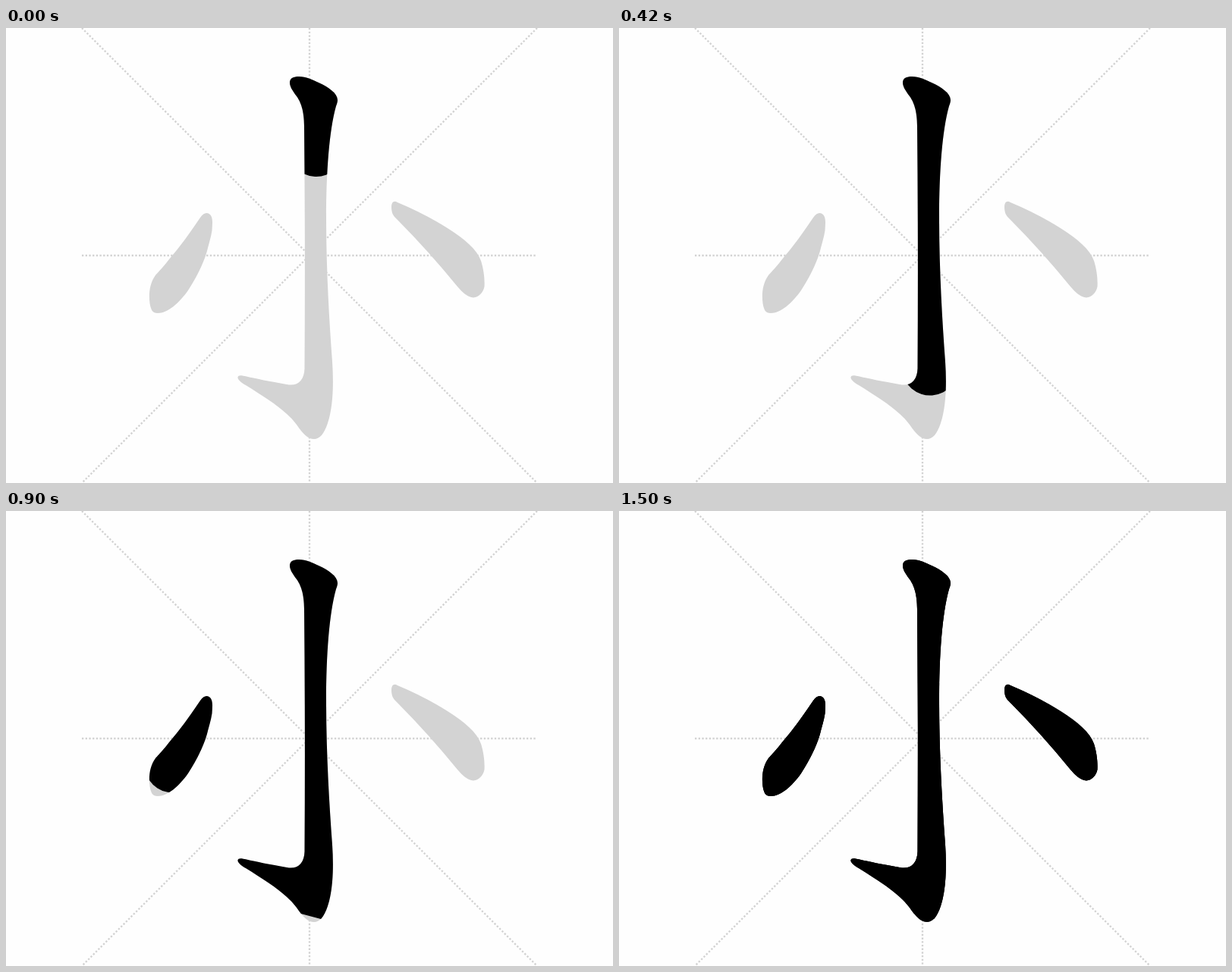
An HTML page that plays this animation: 800 by 600 pixels, repeating every 1.56 s.

```html
<!DOCTYPE html>
<html lang="zh">
<head>
<meta charset="utf-8">
<title>Stroke order</title>
<style>
  html, body { margin: 0; width: 100%; height: 100%; overflow: hidden; background: #fefefe; }
  svg { display: block; width: 800px; height: 600px; }
  .grid { stroke: lightgray; stroke-width: 2.344; stroke-dasharray: 2.344; }
  .ghost { fill: lightgray; }
  .brush { fill: none; stroke: #000; stroke-width: 75; stroke-linecap: round; stroke-dasharray: 1000; }
  .whole { opacity: 0; }
</style>
</head>
<body>
<svg viewBox="0 0 800 600">
  <g class="grid">
    <line x1="100" y1="0" x2="700" y2="600"/>
    <line x1="700" y1="0" x2="100" y2="600"/>
    <line x1="400" y1="0" x2="400" y2="600"/>
    <line x1="100" y1="300" x2="700" y2="300"/>
  </g>
</svg>
<script>
const LOOP = 1560, STEP = 60, DASH = 1000, HIDDEN = -50;

// keys: [time in ms, inked length along the median]
const strokes = [
  {
    outline: 'M374 72C374 66 379 64 386 64C396 64 403 68 412 72C425 78 437 86 437 95C437 98 436 100 435 103' +
      'C426 135 422 190 422 250C422 320 426 385 430 440C432 470 431 500 424 521C419 536 413 542 406 542' +
      'C398 542 391 535 383 523C369 504 343 488 316 471C309 467 305 463 305.5 460.5C306 457 311 458 317 459.5' +
      'Q336 464 370 470C384 473 393 465 393.5 449Q394.5 290 393 130C393 108 388 97 383 90C377 82 374 77 374 72Z',
    median: 'M384 74L412 98L409 160L408 250L410 447L414 499L384 491L349 478L313 463',
    keys: [[0, 97.5], [180, 188.5], [420, 386], [660, 506.6], [720, 537], [780, 560], [LOOP, 560]]
  },
  {
    outline: 'M256 250C260 244 265 242 269 246C273 250 272 258 271.5 267C270 277 267 285 265 294' +
      'C260 312 250 330 240 346C228 363 213 376 200 376C193 376 191 372 189.5 363' +
      'C188 351 189 337 197 326C203 319 209 313 215 305C230 288 243 269 256 250Z',
    median: 'M263 256L252 291L220 334L203 360',
    keys: [[0, HIDDEN], [540, HIDDEN], [540, 12], [660, 36.7], [900, 90.3], [1080, 130], [LOOP, 130]]
  },
  {
    outline: 'M508 236C508 230 511 227 516 230Q552 245 582 264C604 278 621 292 626 307' +
      'C630 320 631 332 630.5 341C629 349 623 355 616 355.5C608 355 601 348 595 341' +
      'Q556 293 513 250C509 246 508 241 508 236Z',
    median: 'M518 237L570 279L598 311L614 338',
    keys: [[0, HIDDEN], [960, HIDDEN], [960, 1.2], [1200, 66.8], [1500, 148], [LOOP, 148]]
  }
];

const svg = document.querySelector('svg');

function add(tag, attrs, parent = svg) {
  const el = document.createElementNS('http://www.w3.org/2000/svg', tag);
  for (const name in attrs) el.setAttribute(name, attrs[name]);
  return parent.appendChild(el);
}

// Moves between keys advance in whole 60 ms steps.
function play(el, prop, keys) {
  const frames = keys.map(([t, value], i) => {
    const next = keys[i + 1] ? keys[i + 1][0] : LOOP;
    const count = Math.max(1, Math.round((next - t) / STEP));
    return { offset: t / LOOP, [prop]: value, easing: `steps(${count}, end)` };
  });
  el.animate(frames, { duration: LOOP, iterations: Infinity, delay: -1 });
}

for (const { outline } of strokes) add('path', { d: outline, class: 'ghost' });

strokes.forEach(({ outline, median, keys }, i) => {
  const clip = add('clipPath', { id: 'clip' + i });
  add('path', { d: outline }, clip);
  const brush = add('path', { d: median, class: 'brush', 'clip-path': `url(#clip${i})` });
  play(brush, 'strokeDashoffset', keys.map(([t, len]) => [t, DASH - len]));
});

// The finished character closes the loop.
const whole = add('path', { d: strokes.map(s => s.outline).join(''), class: 'whole' });
play(whole, 'opacity', [[0, 0], [1500, 0], [1500, 1], [LOOP, 1]]);
</script>
</body>
</html>
```
